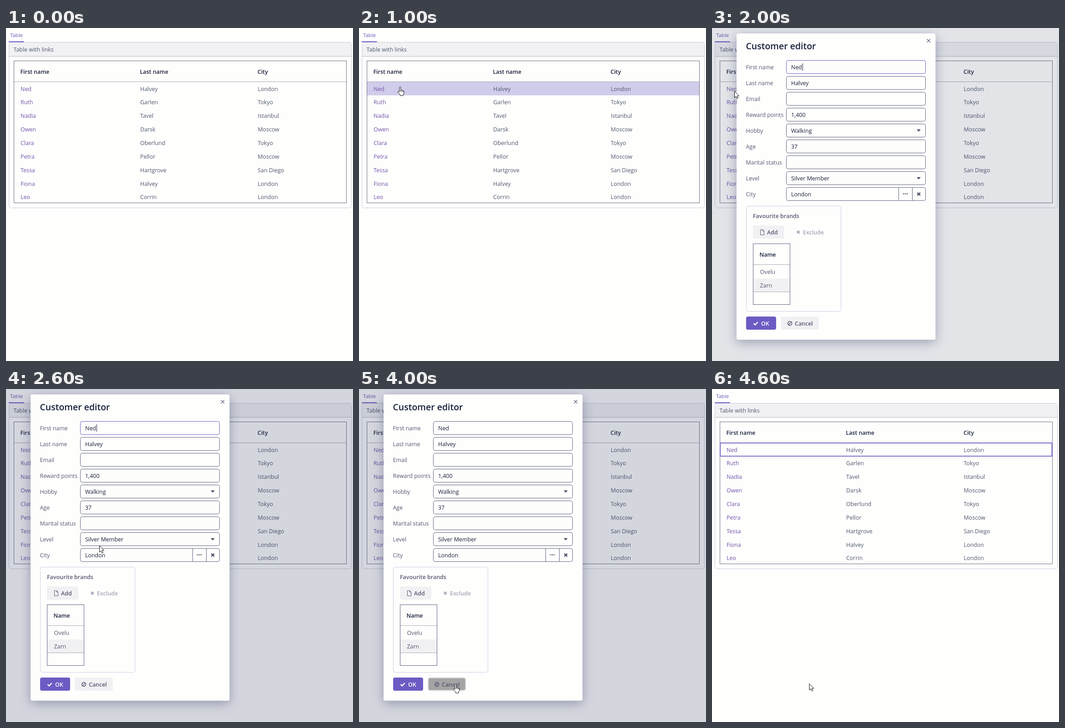
These frames come from a looping animation (763 by 734 pixels, 5.4 s). An HTML page:

```html
<!DOCTYPE html>
<html lang="en">
<head>
<meta charset="utf-8">
<title>Customer table</title>
<style>
  html, body { margin: 0; width: 100%; height: 100%; overflow: hidden; background: #fefefd; }
  svg { display: block; }
  text { font: 12.45px "Open Sans", "Noto Sans", sans-serif; fill: #50586d; }
  .bold { font-weight: 600; }
  .dark { fill: #18203a; }
  .link { fill: #7353a8; }
  .label { fill: #55586f; }
  .muted { fill: #a5a7b6; }
  .tab { font-size: 11.5px; fill: #6c57b0; }
  .title { font-size: 19.5px; font-weight: 600; fill: #18203a; }
  .card { filter: drop-shadow(0 6px 12px rgba(35, 45, 85, .36)); }
</style>
</head>
<body>
<svg id="stage" width="763" height="734" viewBox="0 0 763 734"></svg>
<script>
const INK = '#5f6480', PURPLE = '#6c5bc3', PAGE = '#fefefd', PALE = '#f1f1f4';

// Text placed by the vertical middle of its capitals
const text = (x, y, s, cls = '', extra = '') =>
  `<text x="${x}" y="${y + 4.5}" class="${cls}" ${extra}>${s}</text>`;
const rect = (x, y, w, h, fill, stroke = 'none', r = 0, extra = '') =>
  `<rect x="${x}" y="${y}" width="${w}" height="${h}" rx="${r}" fill="${fill}" stroke="${stroke}" ${extra}/>`;
const path = (d, stroke, width = 1, fill = 'none', extra = '') =>
  `<path d="${d}" stroke="${stroke}" stroke-width="${width}" fill="${fill}" ${extra}/>`;
const cross = (x, y, r, color, width) =>
  path(`M${x - r} ${y - r}l${2 * r} ${2 * r}m0 ${-2 * r}l${-2 * r} ${2 * r}`, color, width);

const people = [
  'Ned,Halvey,London', 'Ruth,Garlen,Tokyo', 'Nadia,Tavel,Istanbul',
  'Owen,Darsk,Moscow', 'Clara,Oberlund,Tokyo', 'Petra,Pellor,Moscow',
  'Tessa,Hartgrove,San Diego', 'Fiona,Halvey,London', 'Leo,Corrin,London'
].map(row => row.split(','));

const fields = [
  ['First name', 'Ned'], ['Last name', 'Halvey'], ['Email', ''],
  ['Reward points', '1,400'], ['Hobby', 'Walking', true], ['Age', '37'],
  ['Marital status', ''], ['Level', 'Silver Member', true], ['City', 'London']
];

function page() {
  return text(9, 15.5, 'Table', 'tab') +
    rect(6.5, 31.5, 753, 365, PAGE, '#cccbdc', 5) +
    rect(7, 32, 752, 30, PALE) +
    path('M6 31.5H759', '#cccbdc') + path('M6 30.2H39.5', PURPLE, 2) +
    path('M7 62.5H759', '#b9b9bd') +
    text(16.5, 47.5, 'Table with links') +
    rect(17.5, 72.5, 731, 313, PAGE, '#6d7084') +
    rect(18, 119, 730, 29.5, '#d0cceb', 'none', 0, 'id="hover"') +
    path('M18 118.5H748', '#aaaab1') +
    ['First name', 'Last name', 'City'].map((s, i) =>
      text([31.5, 294.5, 553][i], 96.5, s, 'bold dark')).join('') +
    people.map((row, r) => row.map((s, i) =>
      text([32, 295, 553.5][i], 134 + r * 29.87, s, i ? '' : 'link')).join('')).join('') +
    rect(18, 119, 729.5, 29, 'none', PURPLE, 0, 'id="focus" stroke-width="1.7"');
}

function field([label, value, combo], i) {
  const y = 85.5 + i * 35.12;
  return text(74.5, y + .5, label, 'label') +
    rect(163.5, Math.round(y - 15) + .5, 306, 29, PAGE, INK, 4, i ? '' : 'id="first"') +
    text(174, y + .5, value, 'dark') +
    (combo ? path(`M450 ${y - 2.5}h9l-4.5 5z`, 'none', 0, '#4d5169') : '');
}

function dialog() {
  return rect(54, 12, 437.5, 675, PAGE, 'none', 4, 'class="card"') +
    `<text x="74.5" y="47.3" class="title">Customer editor</text>` +
    cross(476.3, 28, 3.7, '#4d5169', 1.2) +
    fields.map(field).join('') +
    rect(199, 78, 1, 16, '#18203a', 'none', 0, 'id="caret"') +
    path('M410.5 352V381M440.5 352V381', INK) +
    [421, 425, 429].map(x => `<circle cx="${x}" cy="365.5" r="1.3" fill="#4d5169"/>`).join('') +
    cross(454.7, 366, 3.2, '#4d5169', 2.4) +
    rect(75.5, 392.5, 208, 232, PAGE, '#cfcee0', 4) +
    text(90, 414.5, 'Favourite brands', 'bold label') +
    rect(90, 435, 69, 29.5, PALE, 'none', 4) +
    path('M106.5 444.5h5l3 3v8.5h-8zM111.5 444.5v3h3', '#55586f') +
    text(121, 450, 'Add', 'bold label') +
    cross(189.7, 450, 2.8, '#a5a7b6', 2.4) +
    text(200, 450, 'Exclude', 'bold muted') +
    rect(90, 552, 82, 29.5, PALE) +
    path('M90 521.5H172M90 581.5H172', '#aaaab5') +
    rect(90.5, 475.5, 81, 134, 'none', INK) +
    text(104.5, 499.5, 'Name', 'bold dark') +
    text(105.5, 537.5, 'Ovelu', 'label') + text(105.5, 567.5, 'Zarn', 'label') +
    rect(75, 636, 66, 29, PURPLE, 'none', 4) +
    path('M91.5 651l3.3 3.3 6-6.3', '#fff', 2.3) +
    text(108, 651, 'OK', 'bold', 'style="fill:#fff"') +
    rect(151.5, 636, 83.5, 29, PALE, 'none', 4, 'id="cancel"') +
    path('M175.6 651a4.4 4.4 0 1 1-8.8 0a4.4 4.4 0 1 1 8.8 0M168.2 654l6-6', '#55586f', 1.5) +
    text(182, 651, 'Cancel', 'bold label');
}

const arrow = path('M.5 .5V14.7l3.3-3 2.2 5 2.4-1-2.2-4.8h4.3z', '#111', 1, '#fff', 'id="arrow"');
const hand = path('M4.5 12V2.2q0-1.7 1.5-1.7t1.5 1.7V8q2.4-1 2.9.6 2-.6 2.4.9 1.7-.2 1.7 1.5v3l-1.8 4v2H6v-2L1 12.7q-.8-1.5.4-2.1 1.4-.4 3.1 1.9M7.5 8v3.5M10.4 9v2.7M12.8 10v2',
  '#111', 1, '#fff', 'id="hand"');

const $ = id => document.getElementById(id);
$('stage').innerHTML = page() +
  rect(0, 0, 763, 734, '#2d375f', 'none', 0, 'id="shade"') +
  `<g id="dialog">${dialog()}</g>` + arrow + hand;

// Pointer stops: time, x, y, shape
const stops = [
  [0, 0, 0, ''], [400, 183, 6, 'arrow'], [600, 145, 60, 'arrow'], [800, 108, 113, 'arrow'],
  [1000, 84.5, 129, 'hand'], [1200, 60, 132, 'hand'], [1400, 44, 138, 'hand'],
  [1800, 49, 139, 'arrow'], [2400, 125, 240, 'arrow'], [2600, 205, 345, 'arrow'],
  [2800, 262, 519, 'arrow'], [3000, 248, 617, 'arrow'], [3200, 213.5, 643, 'hand'],
  [3400, 206.5, 650, 'hand'], [4200, 213.5, 649, 'arrow']
];

const within = (t, a, b) => t >= a && t < b;
const show = (id, on) => $(id).setAttribute('visibility', on ? 'visible' : 'hidden');
const set = (id, attrs) => {
  for (const k in attrs) $(id).setAttribute(k, attrs[k]);
};

function draw(now) {
  const t = Math.floor(now % 5400 / 200) * 200; // the picture advances in 200 ms steps
  const open = within(t, 1800, 4200);
  const [, x, y, shape] = stops.filter(s => s[0] <= t).pop();
  for (const id of ['arrow', 'hand']) {
    show(id, id === shape);
    set(id, { transform: `translate(${x} ${y})` });
  }
  show('hover', within(t, 1000, 1800));
  show('focus', t >= 4200);
  set('dialog', { opacity: open ? (t < 2000 ? .82 : 1) : 0 });
  set('shade', { opacity: !open || t < 2000 ? 0 : t < 2200 ? .13 : t < 2400 ? .17 : .2 });
  set('caret', {
    opacity: +(within(t, 1800, 2200) || within(t, 2600, 2800) || within(t, 3400, 3800))
  });
  set('first', { stroke: t < 4000 ? PURPLE : INK });
  const pressed = t >= 3800;
  set('cancel', {
    fill: pressed ? '#a4a4a5' : t >= 3200 ? '#cbcbcd' : PALE,
    stroke: pressed ? '#cbcbcd' : 'none',
    'stroke-width': 2, x: pressed ? 152.5 : 151.5, width: pressed ? 81.5 : 83.5,
    y: pressed ? 637 : 636, height: pressed ? 27 : 29
  });
}

const start = performance.now();
(function tick() {
  draw(performance.now() - start);
  requestAnimationFrame(tick);
})();
</script>
</body>
</html>
```
